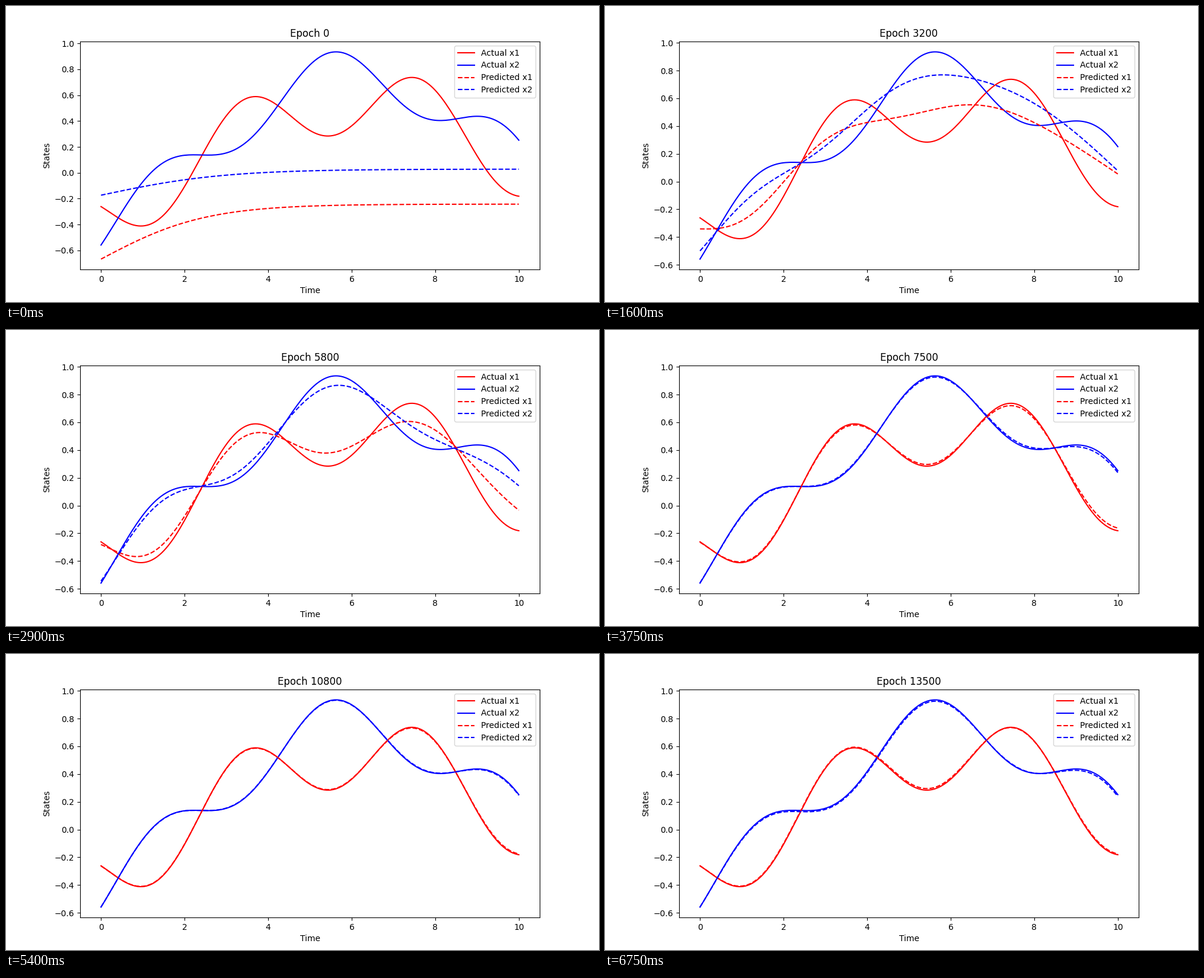
A matplotlib script for the animation above (6800 ms loop, 1000x500 px).

```python
import numpy as np
import matplotlib.pyplot as plt
from matplotlib.animation import FuncAnimation

FRAMES, INTERVAL = 136, 50
# Frames at which one training phase gives way to the next
FLAT, HUMP, BENT, CLOSE, SETTLED = 3, 16, 32, 58, 86

t = np.linspace(0, 10, 201)


def slow(t):
    return np.outer([.558, .756], np.cos(.374 * (t - 6.07)))


def fast(t):
    return np.outer([-.26, .192], np.cos(1.494 * (t - 5.515)))


def mix(a, b, w):
    return a + (b - a) * w


def ease_out(p):
    return 1 - (1 - p)**2


def wave(gain, reach, lead, lag):
    """Fast mode as learned so far: fading with time and out of phase."""
    late = lag * (t / 10)**4
    return gain * np.exp(-(t / reach)**2) * fast(t + lead - late)


actual = slow(t) + fast(t)
untrained = np.array([-.2425 - .425 * (1 - np.tanh(.4 * t)),
                      .028 - .2015 * (1 - np.tanh(.34 * t))])
rise = np.exp(-(t / 2.3)**1.6)
plateau = np.array([.40 - .72 * rise, .58 - .95 * rise])
tail = .05 * (t / 10)**4 * np.cos(1.25 * (t - 10))

# gain, reach, lead and lag of the learned wave
hump = np.array([.12, 3, .15, 0])
bent = np.array([.43, 5, .15, 0])
close = np.array([.8, 11.5, 0, .55])

drift = np.array([.008 * np.exp(-((t - 4.5) / 3)**2),
                  -.010 * np.abs(np.sin(np.pi * t / 7.5))])


def predicted(i):
    if i < FLAT:
        return mix(untrained, plateau, i / FLAT)
    if i < HUMP:
        p = (i - FLAT) / (HUMP - FLAT)
        return mix(plateau, slow(t) + wave(*hump) + tail, ease_out(p))
    if i < BENT:
        p = (i - HUMP) / (BENT - HUMP)
        return slow(t) + wave(*mix(hump, bent, p)) + (1 - p) * tail
    if i < CLOSE:
        p = (i - BENT) / (CLOSE - BENT)
        return slow(t) + wave(*mix(bent, close, ease_out(p)))
    left = .04 + .96 * np.exp(-.14 * (i - CLOSE))
    y = slow(t) + mix(fast(t), wave(*close), left)
    if i > SETTLED:
        y += drift * np.sin(2.5 * np.pi * (i - 108) / 27)
    return y


fig, ax = plt.subplots(figsize=(10, 5), dpi=100)
ax.plot(t, actual[0], 'r-', label='Actual x1')
ax.plot(t, actual[1], 'b-', label='Actual x2')
lines = [ax.plot(t, untrained[0], 'r--', label='Predicted x1')[0],
         ax.plot(t, untrained[1], 'b--', label='Predicted x2')[0]]
ax.set_xlabel('Time')
ax.set_ylabel('States')
ax.legend(loc='upper right')
title = ax.set_title('Epoch 0')


def update(i):
    for line, y in zip(lines, predicted(i)):
        line.set_ydata(y)
    ax.relim()
    ax.autoscale_view()
    title.set_text(f'Epoch {100 * i}')
    return lines


anim = FuncAnimation(fig, update, frames=FRAMES, interval=INTERVAL,
                     repeat=True, repeat_delay=0, blit=False)
plt.show()
```
